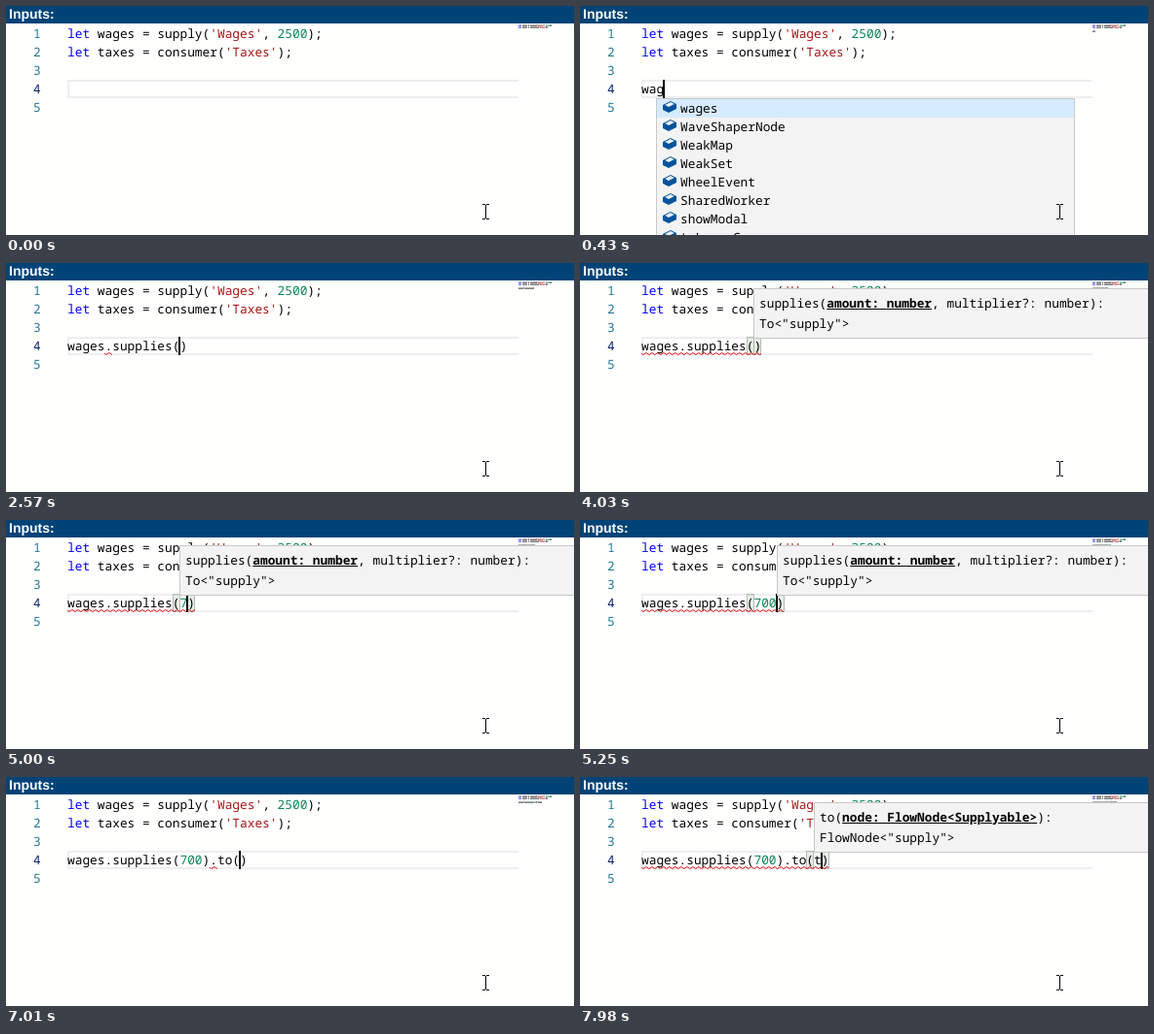
Recreate the animation shown at these times as an HTML page with a canvas. Size 583x236 px, loop 8 s.

```html
<!DOCTYPE html>
<html lang="en">
<head>
<meta charset="utf-8">
<title>Code editor</title>
<style>
  html, body { margin: 0; width: 100%; height: 100%; overflow: hidden; background: #fffffe; }
  #stage { position: relative; width: 583px; height: 236px; overflow: hidden;
    font: 12.83px/18px "Noto Sans Mono", monospace; text-rendering: geometricPrecision;
    font-variant-ligatures: none; white-space: pre; color: #000; }
  #stage > *, #live > * { position: absolute; box-sizing: border-box; }
  header { left: 0; top: 0; width: 583px; height: 18px; padding-left: 3px; background: #004377;
    color: #fff; font: bold 14px/16px "Liberation Sans", sans-serif; }
  .current { left: 63px; top: 76px; width: 463px; height: 19px; border: 2px solid #eee; border-right: 0; }
  .line { left: 63px; height: 19px; }
  .number { left: 28px; color: #237893; }
  .active { color: #0b216f; }
  #live { left: 0; top: 0; width: 583px; height: 236px; }
  .match { top: 76px; height: 19px; width: 8px; background: rgba(0, 100, 0, .1); border: 1px solid #b9b9b9; }
  .caret { top: 76px; width: 2px; height: 19px; background: #000; }
  .menu { top: 95px; width: 430px; background: #f3f3f3; border: 1px solid #c8c8c8; overflow: hidden; }
  .item { position: relative; height: 19px; padding: 0 6px 0 24px; overflow: hidden; text-overflow: ellipsis; }
  .item svg { position: absolute; left: 5px; top: 1px; }
  .selected { background: #d6ebff; }
  .detail { margin-left: 14px; opacity: .7; }
  .tip { top: 26px; width: 480px; height: 52px; padding: 4px 5px; background: #f3f3f3; border: 1px solid #c8c8c8; }
  .tip div { height: 21px; line-height: 20px; }
  .tip b { text-decoration: underline; }
</style>
</head>
<body>
<div id="stage">
  <header>Inputs:</header>
  <div class="current"></div>
  <canvas id="minimap" width="57" height="8" style="left:526px;top:19px"></canvas>
  <div id="live"></div>
  <svg width="9" height="17" style="left:488px;top:204px" fill="none" stroke="#000">
    <path d="M1 .5h3m1 0h3M4.5 1v14M1 15.5h3m1 0h3"/>
  </svg>
</div>
<script>
const LOOP = 8000, CHAR = 7.698, LEFT = 63, ROW = 19;
const header = ["let wages = supply('Wages', 2500);", "let taxes = consumer('Taxes');", ""];
const stage = document.getElementById("stage");
const live = document.getElementById("live");
const minimap = document.getElementById("minimap").getContext("2d");

const columnX = col => LEFT + col * CHAR;
const lineTop = i => ROW * (i + 1);

const globals = ["wages", "WeakMap", "WeakSet", "while", "window", "with", "WebSocket", "Worker"];
const waMatches = ["wages", "WaveShaperNode", "WeakMap", "WeakSet", "WheelEvent", "SharedWorker", "showModal", "toLowerCase"];
const members = ["name", "supplies", "suppliesAsMuchAsNecessary", "suppliesAsMuchAsPossible", "type"];
const menu = (col, items, selected = 0, detail = "") => ({ col, items, selected, detail });

const supplyTip = ["supplies(<b>amount: number</b>, multiplier?: number):", 'To&lt;"supply"&gt;'];
const toTip = ["to(<b>node: FlowNode&lt;Supplyable&gt;</b>):", 'FlowNode&lt;"supply"&gt;'];
const tip = (col, lines) => ({ col, lines });

const suppliesDetail = "(property) supplies: (amount: number, multiplier?: number) => To";
const toDetail = "(property) to: (node: FlowNode&lt;Supplyable&gt;) => FlowNode";
const full = [0, Infinity];
const type = (text, caret = text.length) => ({ text, caret, on: true });

// Each step changes some parts of the editor state.
const steps = [
  [0, { text: "", caret: 0, on: false, error: null, bracket: -1, menu: null, tip: null }],
  [100, type("w")],
  [150, { menu: menu(1, globals) }],
  [230, type("wa")],
  [280, { menu: menu(2, waMatches) }],
  [430, type("wag")],
  [490, { menu: menu(3, ["wages"]) }],
  [550, { ...type("wage"), menu: menu(4, ["wages"]) }],
  [610, { ...type("wages"), menu: menu(5, ["wages"]) }],
  [790, { ...type("wages."), menu: menu(6, members, 1) }],
  [840, { menu: menu(6, members, 1, suppliesDetail) }],
  [1270, { on: false }],
  [1300, { error: [5, 6] }],
  [1780, { on: true }],
  [2090, { ...type("wages.supplies"), menu: null }],
  [2570, type("wages.supplies()", 15)],
  [2650, { bracket: 14 }],
  [2700, { tip: tip(15, supplyTip) }],
  [3060, { on: false, error: full }],
  [3570, { on: true }],
  [4030, { on: false }],
  [4560, { on: true }],
  [4970, type("wages.supplies(7)", 16)],
  [5020, { tip: tip(16, supplyTip) }],
  [5110, type("wages.supplies(70)", 17)],
  [5150, { tip: tip(17, supplyTip) }],
  [5200, type("wages.supplies(700)", 18)],
  [5250, { tip: tip(18, supplyTip) }],
  [5430, { caret: 19 }],
  [5470, { tip: null }],
  [5740, { ...type("wages.supplies(700)."), error: [0, 19], bracket: -1, menu: menu(20, ["to"]) }],
  [5790, { menu: menu(20, ["to"], 0, toDetail) }],
  [6220, { on: false, error: [19, 20] }],
  [6530, { ...type("wages.supplies(700).to"), menu: null }],
  [6960, type("wages.supplies(700).to()", 23)],
  [7040, { bracket: 22 }],
  [7090, { tip: tip(23, toTip) }],
  [7470, { on: false, error: full }],
  [7930, type("wages.supplies(700).to(t)", 24)]
];

const colour = part => part === "let" ? "#0000ff" : part[0] === "'" ? "#a31515" : /^\d/.test(part) ? "#098658" : "#000000";
const tokens = line => line.split(/('[^']*'|\blet\b|\b\d+\b)/).filter(Boolean);
const codeLine = (line, i) => `<div class="line" style="top:${lineTop(i)}px">` +
  tokens(line).map(part => `<span style="color:${colour(part)}">${part}</span>`).join("") + "</div>";

const box = (name, x, body = "", extra = "") => `<div class="${name}" style="left:${Math.round(x)}px;${extra}">${body}</div>`;

const cube = `<svg width="16" height="14"><path fill="#00539c" d="M9 1 1 5v5l6 3 8-4V4z"/>
  <path fill="#f0eff1" d="M9 2.1 12.8 4 7 6.9 3.2 5z"/></svg>`;

function menuBox({ col, items, selected, detail }) {
  const rows = items.map((name, i) => {
    const note = i === selected && detail ? `<span class="detail">${detail}</span>` : "";
    return `<div class="item${i === selected ? " selected" : ""}">${cube}${name}${note}</div>`;
  });
  return box("menu", columnX(col), rows.join(""), `height:${items.length * ROW}px`);
}

function squiggle([from, to]) {
  const width = (to - from) * CHAR;
  let path = "M-1.2 .5";
  for (let x = 1.8; x < width + 6; x += 6) path += `L${x} 2.5L${x + 3} .5`;
  return `<svg style="left:${columnX(from)}px;top:92px" width="${width}" height="3">
    <path d="${path}" fill="none" stroke="#e01010"/></svg>`;
}

function drawMinimap(lines) {
  minimap.clearRect(0, 0, 57, 8);
  lines.forEach((line, row) => {
    let x = 0;
    for (const part of tokens(line)) {
      minimap.fillStyle = colour(part);
      for (const char of part) {
        if (char !== " ") {
          minimap.globalAlpha = /[a-z]/.test(char) ? .3 : .4;
          minimap.fillRect(x, row * 2, 1, 1);
          minimap.globalAlpha = /[.,']/.test(char) ? .15 : .5;
          minimap.fillRect(x, row * 2 + 1, 1, 1);
        }
        x++;
      }
    }
  });
}

function render(state) {
  const { text, caret, on, error, bracket } = state;
  const lines = [...header, text];
  let html = "";
  if (bracket >= 0) html += box("match", columnX(bracket)) + box("match", columnX(text.length - 1));
  if (error) html += squiggle([error[0], Math.min(error[1], text.length)]);
  html += lines.map(codeLine).join("");
  if (on) html += box("caret", columnX(caret) - 1);
  if (state.menu) html += menuBox(state.menu);
  if (state.tip) html += box("tip", columnX(state.tip.col), state.tip.lines.map(l => `<div>${l}</div>`).join(""));
  live.innerHTML = html;
  drawMinimap(lines);
}

for (let i = 0; i < 5; i++) {
  stage.insertAdjacentHTML("afterbegin",
    `<div class="number${i === 3 ? " active" : ""}" style="top:${lineTop(i)}px">${i + 1}</div>`);
}

const start = performance.now();
let shown = 0;
function tick() {
  const time = Math.max(0, performance.now() - start) % LOOP;
  const past = steps.filter(([at]) => at <= time);
  if (past.length !== shown) {
    shown = past.length;
    render(Object.assign({}, ...past.map(([, change]) => change)));
  }
  requestAnimationFrame(tick);
}
tick();
</script>
</body>
</html>
```
